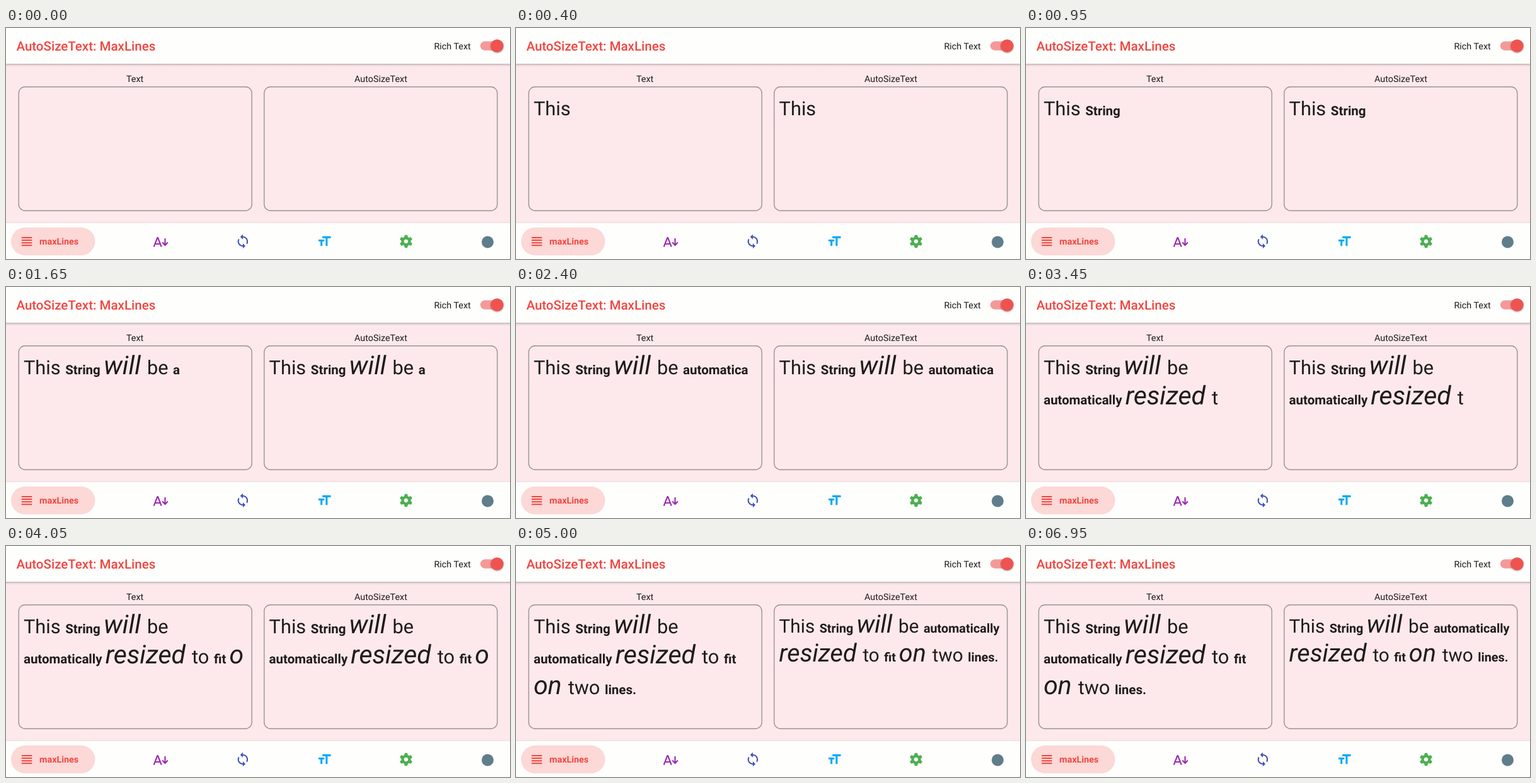
Write an HTML page that moves like this. It is 800 px wide and 368 px high and loops after 8000 ms.

```html
<!DOCTYPE html>
<html lang="en">
<head>
<meta charset="utf-8">
<title>AutoSizeText: MaxLines</title>
<style>
html, body { margin: 0; width: 100%; height: 100%; overflow: hidden; background: #fde9eb; }
svg { display: block; width: 800px; height: 368px; }
text { font-family: Roboto, sans-serif; font-size: 14.36px; fill: #1f1b1b; white-space: pre; text-rendering: geometricPrecision; }
.box { fill: none; stroke: #9a9294; stroke-width: 1.4; }
.mid { text-anchor: middle; }
</style>
</head>
<body>
<svg viewBox="0 0 800 368">
  <defs>
    <linearGradient id="shade" x2="0" y2="1">
      <stop offset="0" stop-color="#000" stop-opacity=".3"/>
      <stop offset=".35" stop-color="#000" stop-opacity=".1"/>
      <stop offset="1" stop-color="#000" stop-opacity="0"/>
    </linearGradient>
    <filter id="soft" x="-50%" y="-50%" width="200%" height="200%"><feGaussianBlur stdDeviation="1.2"/></filter>
  </defs>
  <rect width="800" height="368" fill="#fde9eb"/>

  <rect width="800" height="57.2" fill="#fefefd"/>
  <rect y="57" width="800" height="5" fill="url(#shade)"/>
  <text x="16.4" y="36.3" style="font-size:20.51px;font-weight:500;fill:#f04640">AutoSizeText: MaxLines</text>
  <text x="679.4" y="33.6">Rich Text</text>
  <rect x="752.8" y="21.3" width="34" height="14.4" rx="7.2" fill="#f39a99"/>
  <circle cx="779.5" cy="29.8" r="10.3" fill="#000" opacity=".3" filter="url(#soft)"/>
  <circle cx="779.5" cy="28.5" r="10.3" fill="#ef5350"/>

  <text class="mid" x="204.6" y="85.6">Text</text>
  <text class="mid" x="594.9" y="85.6">AutoSizeText</text>
  <rect class="box" x="20.2" y="93.7" width="370" height="197.3" rx="10"/>
  <rect class="box" x="409.8" y="93.7" width="370" height="197.3" rx="10"/>
  <g id="words"></g>

  <rect y="309" width="800" height="2" fill="#000" opacity=".05"/>
  <rect y="310.6" width="800" height="57.4" fill="#fefefd"/>
  <rect x="8" y="317.8" width="133.4" height="44.4" rx="22.2" fill="#fcd8d6"/>
  <text x="53" y="345.3" style="font-weight:700;fill:#f04640">maxLines</text>
  <g transform="translate(20.7 327.8) scale(1.0256)" fill="#f04640">
    <path d="M4 5h16v2H4zM4 9h16v2H4zM4 13h16v2H4zM4 17h16v2H4z"/>
  </g>
  <g fill="none" stroke="#9c27b0" stroke-width="2.1">
    <path d="M234.7 348.7L240.2 334.4H241.2L246.7 348.7M236.6 344H244.8"/>
    <path d="M252.5 335V346M248.2 341.6L252.5 345.9L256.8 341.6"/>
  </g>
  <g transform="translate(363.6 327.7) scale(1.0256)" fill="#3f51b5">
    <path d="M12 4V1L8 5l4 4V6c3.31 0 6 2.69 6 6 0 1.01-.25 1.97-.7 2.8l1.46 1.46C19.54 15.03 20 13.57 20 12c0-4.42-3.58-8-8-8zm0 14c-3.31 0-6-2.69-6-6 0-1.01.25-1.97.7-2.8L5.24 7.74C4.46 8.97 4 10.43 4 12c0 4.42 3.58 8 8 8v3l4-4-4-4v3z"/>
  </g>
  <g transform="translate(493 327.7) scale(1.0256)" fill="#03a9f4">
    <path d="M9 4v3h5v12h3V7h5V4H9zm-6 8h3v7h3v-7h3V9H3v3z"/>
  </g>
  <g transform="translate(635 340)" fill="#4caf50">
    <g id="teeth"></g>
    <circle r="5.4" fill="none" stroke="#4caf50" stroke-width="4.2"/>
  </g>
  <circle cx="764.5" cy="341" r="9.5" fill="#607d8b"/>
</svg>
<script>
const NS = 'http://www.w3.org/2000/svg';
const LOOP = 8000, STEP = 81, LEAD = 60, WRAP = 354;
const UNIT = 800 / 780;
const WORDS = 'This String will be automatically resized to fit on two lines.'.match(/\S+ ?/g);
const STYLES = [
  { size: 30, font: 'normal 400' },
  { size: 20, font: 'normal 700' },
  { size: 40, font: 'italic 400' }
];
const pen = document.createElement('canvas').getContext('2d');
const group = document.getElementById('words');

function add(parent, tag, attrs) {
  const el = document.createElementNS(NS, tag);
  for (const k in attrs) el.setAttribute(k, attrs[k]);
  return parent.appendChild(el);
}

for (let i = 0; i < 6; i++) {
  add(document.getElementById('teeth'), 'path', {
    d: 'M-3 -6L-2.3 -9.6Q-2.2 -10.2 -1.6 -10.2H1.6Q2.2 -10.2 2.3 -9.6L3 -6Z',
    transform: `rotate(${i * 60})`
  });
}

const fontOf = (i, scale) => {
  const s = STYLES[i % 3];
  return `${s.font} ${(s.size * UNIT * scale).toFixed(3)}px Roboto, sans-serif`;
};

function widthOf(text, font) {
  pen.font = font;
  return pen.measureText(text).width;
}

// Breaks the first n characters into placed words.
function layout(n, scale) {
  const items = [];
  let x = 0, line = 0;
  WORDS.forEach((word, i) => {
    const text = word.slice(0, Math.max(0, n));
    n -= word.length;
    if (!text) return;
    const font = fontOf(i, scale);
    if (x && x + widthOf(text.trimEnd(), font) > WRAP) {
      x = 0;
      line++;
    }
    items.push({ text, font, x, line });
    x += widthOf(text, font);
  });
  return { items, lines: line + 1 };
}

function makePane(left, maxLines) {
  const nodes = WORDS.map(() => add(group, 'text', {}));
  return n => {
    let scale = 1, plan = layout(n, scale);
    while (plan.lines > maxLines && scale > 0.5) {
      scale -= 1 / 30;
      plan = layout(n, scale);
    }
    const size = 40 * scale;
    const rise = Math.round(size * 0.9277), drop = Math.round(size * 0.2441);
    nodes.forEach((el, i) => {
      const it = plan.items[i];
      el.textContent = it ? it.text : '';
      if (!it) return;
      el.style.font = it.font;
      el.setAttribute('x', left + it.x);
      el.setAttribute('y', 101.3 + (rise + it.line * (rise + drop)) * UNIT);
    });
  };
}

const panes = [makePane(27.9, Infinity), makePane(417.6, 2)];
let shown = -1;

function draw(t) {
  const n = Math.min(62, Math.floor((t % LOOP + LEAD) / STEP));
  if (n === shown) return;
  shown = n;
  panes.forEach(p => p(n));
}

const start = performance.now();
function tick() {
  draw(performance.now() - start);
  requestAnimationFrame(tick);
}
tick();
</script>
</body>
</html>
```
